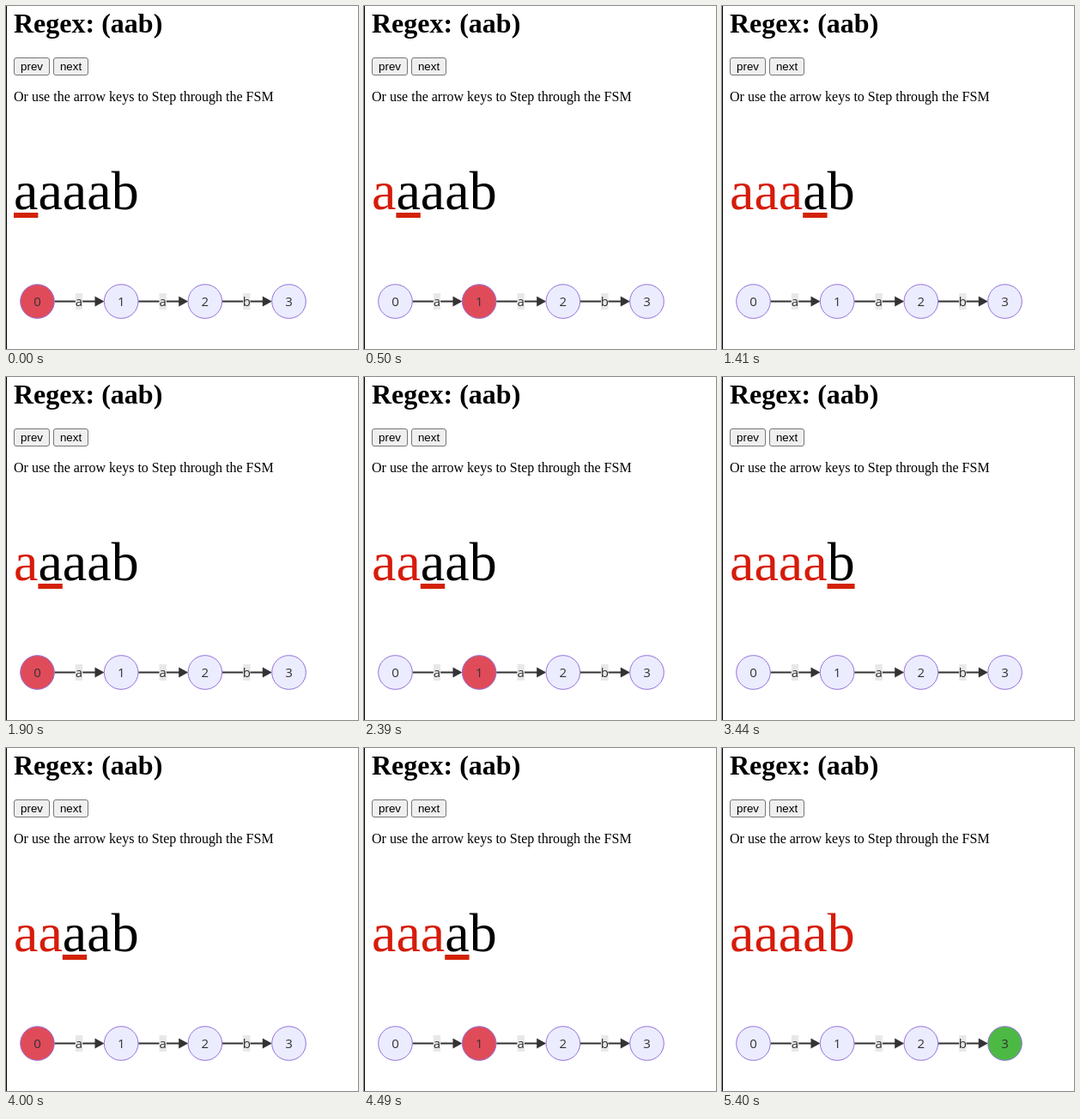
Animation of 410x400 px, one loop 8 s. Source, as an HTML page:

```html
<!DOCTYPE html>
<html lang="en">
<head>
<meta charset="utf-8">
<title>Regex FSM</title>
<style>
  html, body { margin: 0; width: 100%; height: 100%; overflow: hidden; background: #fff; }
  svg { display: block; }
  text { font-family: "Liberation Serif", "Times New Roman", serif; white-space: pre; }
  .button rect { fill: #efefef; stroke: #767676; }
  .button text { font: 13.333px "Liberation Sans", Arial, sans-serif; text-anchor: middle; }
  .graph text { font: 15px "Open Sans", "Noto Sans", sans-serif; text-anchor: middle; fill: #333; }
  .graph circle { fill: #ececff; stroke: #9370db; }
</style>
</head>
<body>
<svg width="410" height="400" viewBox="0 0 410 400">
  <rect width="1" height="400"/>
  <text x="9" y="31" font-size="32" font-weight="bold">Regex: (aab)</text>
  <g class="button">
    <rect x="9.5" y="60.5" width="41" height="20" rx="2.5"/><text x="30" y="75">prev</text>
    <rect x="55.5" y="60.5" width="40" height="20" rx="2.5"/><text x="75.5" y="75">next</text>
  </g>
  <text x="9" y="111" font-size="16">Or use the arrow keys to Step through the FSM</text>
  <text x="9" y="237" font-size="64"><tspan id="done" fill="#d61c0a"></tspan><tspan id="rest"></tspan></text>
  <rect id="cursor" y="241" width="28.4" height="6" fill="#d32205"/>
  <g class="graph" id="graph"></g>
</svg>
<script>
const INPUT = "aaaab", LETTER = 28.4, LOOP = 8000;
// [start ms, letters read, active state (-1: no match)]
const STEPS = [
  [0, 0, 0], [500, 1, 1], [920, 2, 2], [1410, 3, -1],
  [1900, 1, 0], [2390, 2, 1], [2880, 3, 2], [3370, 4, -1],
  [4000, 2, 0], [4490, 3, 1], [4980, 4, 2], [5400, 5, 3]
];
const $ = id => document.getElementById(id);
const nodeX = i => 36.5 + 97.67 * i;

const edge = (label, i) => {
  const x = nodeX(i), mid = x + 48.5;
  return `<path d="M${x + 20} 344.5H${x + 69}" stroke="#333" stroke-width="2"/>
    <path d="M${x + 67} 338.5l11 6l-11 6z" fill="#333"/>
    <rect x="${mid - 4.2}" y="335" width="8.4" height="19" fill="#e8e8e8"/>
    <text x="${mid}" y="350">${label}</text>`;
};
const node = i => `<circle cx="${nodeX(i)}" cy="344.5" r="19.8"/><text x="${nodeX(i)}" y="350">${i}</text>`;
$("graph").innerHTML = [..."aab"].map(edge).join("") + [0, 1, 2, 3].map(node).join("");
const circles = document.querySelectorAll("circle");

function draw(now) {
  const time = now % LOOP;
  const [, read, state] = STEPS.findLast(step => step[0] <= time);
  $("done").textContent = INPUT.slice(0, read);
  $("rest").textContent = INPUT.slice(read);
  $("cursor").setAttribute("x", 9 + read * LETTER);
  $("cursor").setAttribute("width", read < 4 ? LETTER : read < 5 ? 32 : 0);
  circles.forEach((circle, i) => {
    circle.style.fill = i !== state ? "" : i === 3 ? "#4cb944" : "#e04b5a";
  });
}
function tick() {
  draw(performance.now());
  requestAnimationFrame(tick);
}
tick();
</script>
</body>
</html>
```
